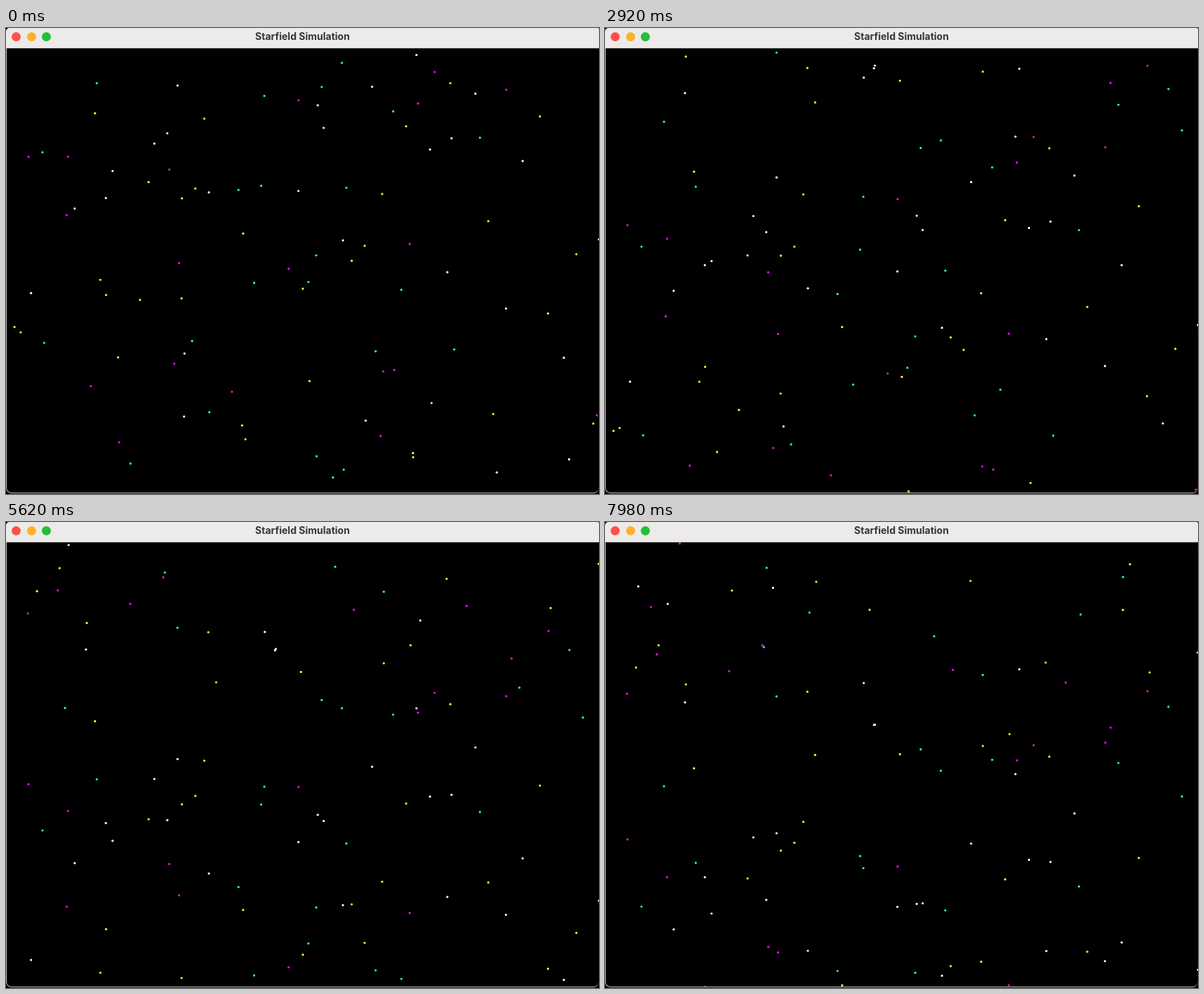
Write an HTML page with a canvas that moves like this. It is 845x663 px and loops after 8000 ms.

```html
<!DOCTYPE html>
<html lang="en">
<head>
<meta charset="utf-8">
<title>Starfield Simulation</title>
<style>
  html, body { margin: 0; width: 100%; height: 100%; overflow: hidden; background: #000; }
  .window { position: absolute; left: 0; top: 0; width: 845px; height: 663px; overflow: hidden; }
  .frame {
    position: absolute; left: 0; top: 20px; width: 845px; height: 642px; box-sizing: border-box;
    border: solid #c9c4c4; border-width: 0 0 1px 1px; border-radius: 0 0 8px 8px;
  }
  canvas { position: absolute; left: 0; top: 0; }
  .bar {
    position: absolute; left: 0; top: 0; width: 845px; height: 28px;
    background: #ecebe9; border-bottom: 1px solid #c4c2bf; border-radius: 5px 2px 0 0;
    font: 700 14px/24px Inter, sans-serif; color: #38353a; text-align: center;
  }
  .bar i { position: absolute; top: 6px; width: 13px; height: 13px; border-radius: 50%; }
</style>
</head>
<body>
<div class="window">
  <div class="frame"></div>
  <canvas id="sky" width="845" height="663"></canvas>
  <div class="bar">
    <i style="left:8px;background:#ff5149"></i>
    <i style="left:29.5px;background:#fbb12e"></i>
    <i style="left:50.5px;background:#22bf37"></i>
    Starfield Simulation
  </div>
</div>
<script>
const LOOP = 8000;
const TOP = 28, BOTTOM = 661, FIELD_WIDTH = 850;
const RADIUS = 1.6;
const MIN_SPEED = 1.28, MAX_SPEED = 2.54; // px per step

// How many of the hundred stars have each colour.
const palette = { '#ffffff': 28, '#fbfb28': 30, '#22f4f4': 23, '#e612e6': 19 };

function seededRandom(seed) {
  return () => {
    seed = (seed + 0x6d2b79f5) | 0;
    let n = Math.imul(seed ^ (seed >>> 15), 1 | seed);
    n = (n + Math.imul(n ^ (n >>> 7), 61 | n)) ^ n;
    return ((n ^ (n >>> 14)) >>> 0) / 2 ** 32;
  };
}

const random = seededRandom(42);
const between = (low, high) => low + (high - low) * random();

// A star that leaves at the bottom re-enters at the top at nextX.
const makeStar = color => ({
  color,
  x: between(4, FIELD_WIDTH),
  nextX: between(4, FIELD_WIDTH),
  y: between(TOP + 8, BOTTOM - 12),
  speed: between(MIN_SPEED, MAX_SPEED)
});

const stars = Object.entries(palette).flatMap(
  ([color, count]) => Array.from({ length: count }, () => makeStar(color)));

// Steps come in threes, held for 20, 20 and 100 ms.
function stepAt(ms) {
  const t = ms + 20;
  return 3 * Math.floor(t / 140) + Math.min(2, Math.floor(t % 140 / 20)) - 1;
}

const ctx = document.getElementById('sky').getContext('2d');
ctx.beginPath();
ctx.rect(1, TOP, 844, BOTTOM - TOP);
ctx.clip();

function draw(ms) {
  const step = stepAt(ms);
  ctx.clearRect(0, 0, 845, 663);
  for (const star of stars) {
    const y = star.y + star.speed * step;
    const wrapped = y > BOTTOM + RADIUS;
    ctx.fillStyle = star.color;
    ctx.beginPath();
    ctx.arc(wrapped ? star.nextX : star.x, wrapped ? y - (BOTTOM - TOP) : y, RADIUS, 0, 2 * Math.PI);
    ctx.fill();
  }
}

const start = performance.now();
function tick() {
  draw((performance.now() - start) % LOOP);
  requestAnimationFrame(tick);
}
tick();
</script>
</body>
</html>
```
